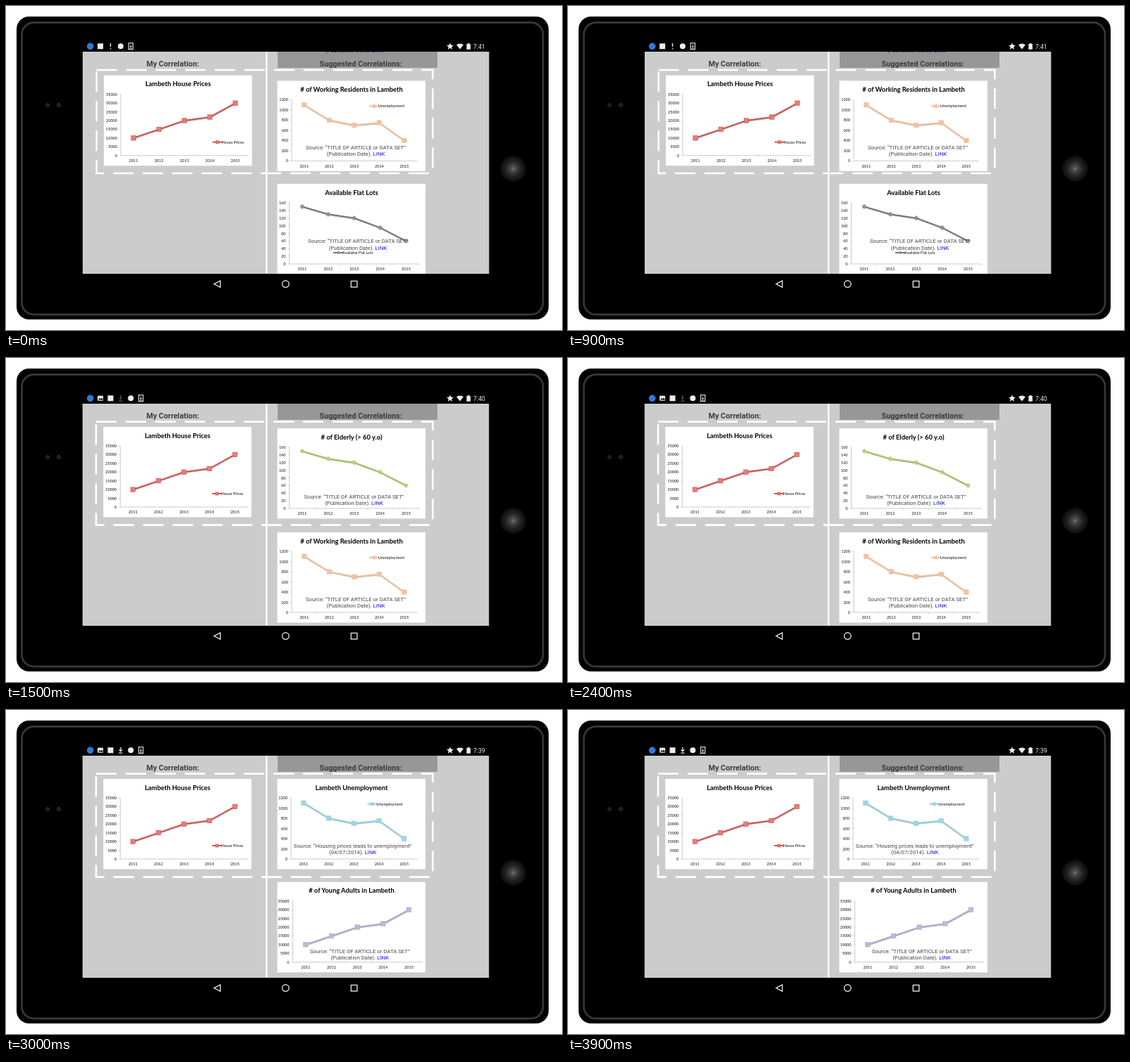
An HTML page for the animation above (4.5 s loop, 790 px wide and 461 px high).

```html
<!DOCTYPE html>
<html lang="en">
<head>
<meta charset="utf-8">
<title>Correlations on a tablet</title>
<style>
html, body { margin: 0; width: 100%; height: 100%; overflow: hidden; background: #fff; }
svg { display: block; width: 790px; height: 461px; }
text { font-family: Roboto, sans-serif; }
.chart text { font: 5.5px Lato, sans-serif; fill: #111; }
.chart .title { font: bold 9.4px Lato, sans-serif; fill: #000; text-anchor: middle; }
.chart .end { text-anchor: end; }
.chart .mid { text-anchor: middle; }
.source { font-size: 7.75px; fill: #444; text-anchor: middle; }
.link { fill: #1212ec; }
.head { font-size: 10.8px; font-weight: bold; fill: #3d3d3d; }
.clock { font-size: 8.6px; fill: #eee; }
.scene { visibility: hidden; animation: show 4.5s step-end infinite; }
.scene:nth-of-type(2) { animation-delay: -3s; }
.scene:nth-of-type(3) { animation-delay: -1.5s; }
@keyframes show {
  0% { visibility: visible; }
  33.3333%, 100% { visibility: hidden; }
}
</style>
</head>
<body>
<svg viewBox="0 0 790 461">
  <defs>
    <radialGradient id="ball">
      <stop offset="0" stop-color="#707070"/>
      <stop offset=".2" stop-color="#484848"/>
      <stop offset=".6" stop-color="#222"/>
      <stop offset="1" stop-color="#0b0b0b"/>
    </radialGradient>
    <clipPath id="screen"><path d="M108.5 65H686.5V381H108.5z"/></clipPath>
  </defs>
  <rect x="15" y="15" width="756" height="431" rx="18"/>
  <rect x="22.5" y="23.5" width="740.5" height="415.5" rx="17" fill="none" stroke="#363636" stroke-width="2.8"/>
  <circle cx="59" cy="141" r="3" fill="#222"/>
  <circle cx="75" cy="141" r="2.4" fill="#111" stroke="#444"/>
  <circle cx="720.5" cy="231.5" r="18.5" fill="url(#ball)"/>
  <g fill="none" stroke="#ddd" stroke-width="1.4">
    <path d="M304.5 390.8V400.4L295.6 395.6z"/>
    <circle cx="397.3" cy="395.6" r="4.8"/>
    <rect x="490.3" y="391.4" width="8.6" height="8.6"/>
  </g>
  <g fill="#eee">
    <path d="M631 52.4l1.4 3.2 3.5.3-2.7 2.3.9 3.5-3.1-1.9-3.1 1.9.9-3.5-2.7-2.3 3.5-.3z"/>
    <path d="M640 55.3Q645 51.8 650 55.3L645 61.6z"/>
    <path d="M654.4 54h1.6v-1.1h2.4V54h1.6v7.8h-5.6z"/>
  </g>
  <g id="scenes"></g>
</svg>
<script>
const HOUSE = [10, 15, 20, 22, 30].map(v => v * 1000);
const JOBS = [1100, 800, 700, 750, 400];
const FALL = [150, 130, 120, 95, 60];
const ARTICLE = '“TITLE OF ARTICLE or DATA SET”';
const DATE = 'Publication Date';

const text = (x, y, str, cls = '') => `<text x="${x}" y="${y}" class="${cls}">${str}</text>`;
const line = (d, color, width) => `<path d="${d}" fill="none" stroke="${color}" stroke-width="${width}"/>`;

function marker(x, y, size, c) {
  const turn = c.diamond ? ` transform="rotate(45 ${x} ${y})"` : '';
  const s = c.diamond ? size * .7 : size;
  return `<rect x="${x - s / 2}" y="${y - s / 2}" width="${s}" height="${s}" fill="${c.light}" stroke="${c.color}" stroke-width=".7"${turn}/>`;
}

// Places are relative to the card's top left corner.
function chart(c, x, y) {
  const { left, width, max, step, data } = c;
  const top = 27, base = 114;
  const py = v => base - (base - top) * v / max;
  const px = i => left + width * (i + .5) / 5;
  let out = '<rect width="210.5" height="128.5" fill="#fff"/>' + text(105.5, 15.7, c.title, 'title');
  let axis = `M${left} ${top}V${base}H${left + width}`;
  for (let v = 0; v <= max; v += step) {
    out += text(left - 5, py(v) + 2, v, 'end');
    axis += `M${left - 1.5} ${py(v)}h1.5`;
  }
  for (let i = 0; i < 5; i++) {
    out += text(px(i), 123.3, 2011 + i, 'mid');
    axis += `M${left + width * (i + 1) / 5} ${base}v1.5`;
  }
  out += line(axis, '#aaa', .6);
  const pts = data.map((v, i) => [px(i), py(v)]);
  const path = 'M' + pts.join('L');
  out += `<g transform="translate(.4 .9)" opacity=".25">${line(path, '#000', 2)}</g>` + line(path, c.color, 2.1);
  out += pts.map(p => marker(...p, 6.4, c)).join('');
  if (c.legend) {
    const [name, lx, ly] = c.legend;
    out += line(`M${lx} ${ly}h14`, c.color, 2) + marker(lx + 7, ly, 4, c) + text(lx + 13, ly + 2, name);
  }
  return `<g class="chart" transform="translate(${x} ${y})">${out}</g>`;
}

const source = (x, y, name, date) =>
  text(x, y, `Source: ${name}`, 'source') +
  text(x, y + 9.2, `(${date}). <tspan class="link">LINK</tspan>`, 'source');

const house = {
  title: 'Lambeth House Prices', left: 24, width: 181, max: 35000, step: 5000, data: HOUSE,
  color: '#cb5750', light: '#e37f78', legend: ['House Prices', 154.5, 95]
};
const working = {
  title: '# of Working Residents in Lambeth', left: 20.5, width: 177.7, max: 1200, step: 200, data: JOBS,
  color: '#f3c09a', light: '#efc3a3', legend: ['Unemployment', 130.5, 36]
};
const jobless = {
  ...working, title: 'Lambeth Unemployment', left: 19.5, width: 178.7,
  color: '#98cddd', light: '#9fd5e5', legend: ['Unemployment', 128, 35.7]
};
const elderly = {
  title: '# of Elderly (&gt; 60 y.o)', left: 17, width: 184.4, max: 160, step: 20, data: FALL,
  color: '#a2c65f', light: '#b5d577', diamond: true
};
const lots = {
  ...elderly, title: 'Available Flat Lots', color: '#777', light: '#929292',
  legend: ['Available Flat Lots', 79.5, 98]
};
const young = {
  ...house, title: '# of Young Adults in Lambeth', left: 22, width: 183.3,
  color: '#b3a8ca', light: '#c3b7d9', legend: null
};

const icons = {
  app: x => `<circle cx="${x}" cy="57.3" r="4.8" fill="#3478d8"/>`,
  dot: x => `<circle cx="${x}" cy="57.3" r="4" fill="#eee"/>`,
  block: x => `<rect x="${x - 4}" y="53.3" width="8" height="8" fill="#eee"/>`,
  photo: x => `<rect x="${x - 4}" y="53.7" width="8" height="7" rx=".8" fill="#eee"/><path d="M${x - 3} 59.6l2-2.5 1.3 1.4 1.6-2.1 2.2 3.2z"/>`,
  page: x => `<rect x="${x - 3.1}" y="52.7" width="6.2" height="9" fill="none" stroke="#eee" stroke-width="1.1"/>` +
    line(`M${x} 54.8v3.6M${x - 1.6} 57l1.6 1.7 1.6-1.7M${x - 1.7} 60h3.4`, '#eee', .9),
  full: x => line(`M${x} 53v5M${x - 2.3} 56.4l2.3 2.4 2.3-2.4M${x - 2.5} 61.2h5`, '#eee', 1.3),
  faint: x => line(`M${x} 53v5M${x - 1.7} 57l1.7 1.7 1.7-1.7M${x - 2.5} 61.2h5`, '#777', 1),
  bar: x => line(`M${x} 53v5M${x} 59.7v1.6`, '#ddd', 1.5)
};

function scene(clock, bar, shift, behind, right) {
  const status = bar.map((name, i) => icons[name](119.7 + i * 14.4)).join('');
  const frame = `<rect x="${128 + shift}" y="${90.6 + shift / 2}" width="${478.4 - shift}" height="147" fill="none" stroke="#fff" stroke-width="2.6" stroke-dasharray="29 13"/>`;
  return `<g class="scene">${status}${text(664, 60.6, clock, 'clock')}<g clip-path="url(#screen)">
    <rect x="${108.5 + shift / 2}" y="65" width="578" height="316" fill="#ccc"/>
    ${behind}<path d="M386 65H613V88H386z" fill="#000" opacity=".26"/>
    ${text(199.5, 86.3, 'My Correlation:', 'head')}${text(445.5, 86.3, 'Suggested Correlations:', 'head')}
    ${frame}${line('M370.2 65V381', '#fff', 2.5)}
    ${chart(house, 138.3 + shift, 98 + shift)}${right}</g></g>`;
}

document.getElementById('scenes').innerHTML =
  scene('7:41', ['app', 'block', 'bar', 'dot', 'page'], .7, source(495, 57, ARTICLE, DATE),
    chart(working, 385.5, 106.4) + source(497, 204, ARTICLE, DATE) +
    chart(lots, 385.5, 253) + source(500, 337.3, ARTICLE, DATE)) +
  scene('7:40', ['app', 'photo', 'block', 'faint', 'dot', 'page'], 0, '',
    chart(elderly, 385.5, 100) + source(494.5, 200.2, ARTICLE, DATE) +
    chart(working, 385.5, 248) + source(497, 346, ARTICLE, DATE)) +
  scene('7:39', ['app', 'photo', 'block', 'full', 'dot', 'page'], 0, '',
    chart(jobless, 385.5, 98) + source(492.7, 196, '“Housing prices leads to unemployment”', '04/07/2014') +
    chart(young, 385.5, 244.7) + source(502.7, 346, ARTICLE, DATE));
</script>
</body>
</html>
```
